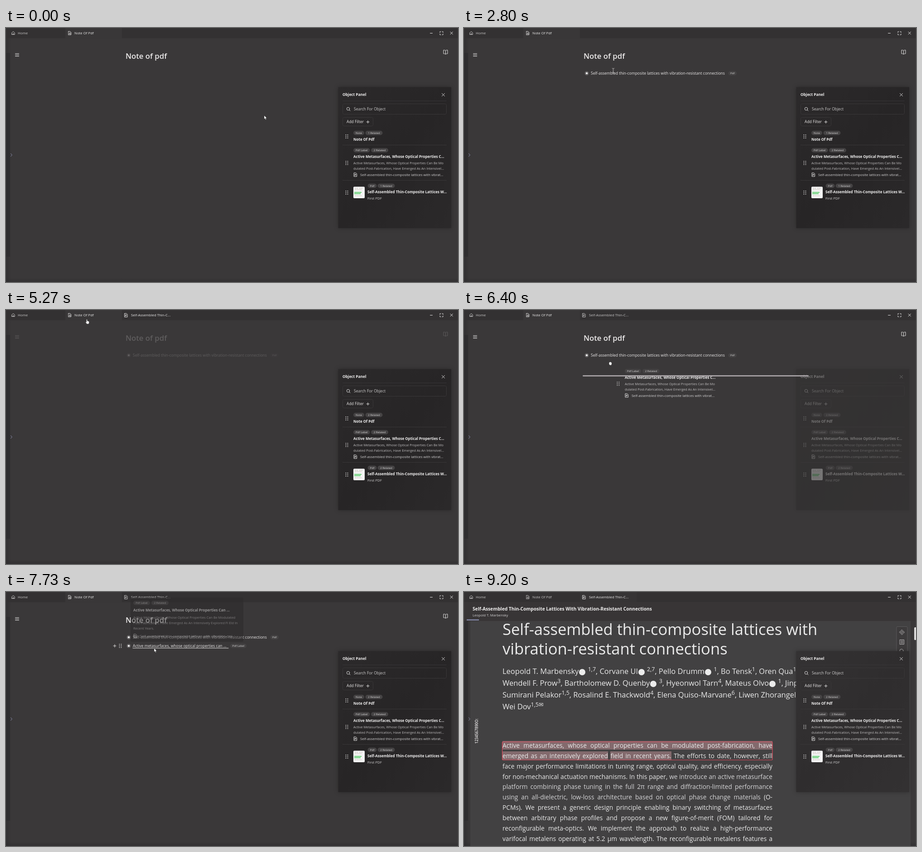
An HTML page for the animation above (9540 ms loop, 998 by 561 pixels).

```html
<!DOCTYPE html>
<html lang="en">
<head>
<meta charset="utf-8">
<title>Note of pdf</title>
<style>
  html, body { margin: 0; width: 100%; height: 100%; overflow: hidden; background: #3a3839; }
  svg { display: block; width: 100vw; height: 100vh; }
  svg, svg div { font-family: "Open Sans", "Noto Sans", sans-serif; }
  text { fill: #eceaea; font-size: 8.5px; font-weight: 500; white-space: pre; }
  .tab { font-size: 7.8px; fill: #efeeee; }
  .bold { font-size: 8px; font-weight: 700; fill: #f0efef; }
  .soft { font-size: 7.4px; fill: #bebcbd; }
  .ref { font-size: 7.7px; fill: #d2d1d2; }
  .chip { font-size: 6.1px; fill: #d8d7d7; text-anchor: middle; }
  .line { fill: none; stroke: #e4e3e3; stroke-width: 1; stroke-linecap: round; stroke-linejoin: round; }
  .rule { fill: none; stroke: #393738; stroke-width: 1; }
  .two { visibility: hidden; }
  .paper .heading { font-size: 34.5px; font-weight: 400; fill: #ebebeb; }
  .paper div { color: #ebebeb; white-space: nowrap; }
  .authors { font-size: 16.5px; line-height: 26px; }
  .authors sup { font-size: 12.5px; line-height: 0; vertical-align: 6px; }
  .authors i { display: inline-block; width: 14px; height: 14px; margin: 0 1px; border-radius: 50%; background: #ebebeb; vertical-align: -3px; }
  .body { font-size: 13.7px; line-height: 22.83px; font-weight: 500; }
  .body div { text-align: justify; text-align-last: justify; }
  .body mark { color: inherit; background: #836a6d; }
  .body span { color: #d6d6d8; }
</style>
</head>
<body>
<script>
const LOOP = 9540;
const TITLE = "Self-assembled thin-composite lattices with vibration-resistant connections";
const AUTHOR = "Leopold T. Marbensky";

const text = (x, y, str, cls = "", extra = "") => `<text x="${x}" y="${y}" class="${cls}" ${extra}>${str}</text>`;
const line = (d, extra = "") => `<path class="line" d="${d}" ${extra}/>`;
const rect = (x, y, w, h, fill, extra = "") => `<rect x="${x}" y="${y}" width="${w}" height="${h}" fill="${fill}" ${extra}/>`;
const chip = (x, y, w, str, cls = "") =>
  `<g class="${cls}">${rect(x, y - 4.7, w, 9.4, "#454344", 'rx="4.7"')}${text(x + w / 2, y + 2.2, str, "chip")}</g>`;
const dots = (x, y) => [0, 1, 2, 3, 4, 5].map(i =>
  `<circle cx="${x - 2 + i % 2 * 4}" cy="${y - 3.5 + (i >> 1) * 3.5}" r="0.9" fill="#dddcdc"/>`).join("");
const doc = (x, y) => line(`M${x - 3} ${y - 4}h4l2 2v6h-6ZM${x - 1.2} ${y + 2}v-3h2v1.5h-2`, 'stroke-width=".9"');
const bullet = y => `<circle cx="271" cy="${y}" r="4.5" fill="#666465"/><circle cx="271" cy="${y}" r="2.1" fill="#fff"/>`;
const related = (x, y) => chip(x, y, 38, "1 Related", "one") + chip(x, y, 38, "2 Related", "two");
const thumb = (x, y) => rect(x, y, 25, 25.5, "#f4f4f4", 'rx="2"') +
  `<path d="M${x + 3} ${y + 3.5}h8m2 0h8M${x + 3} ${y + 6.5}h15M${x + 3} ${y + 20}h16" stroke="#b9a9a0" stroke-width=".8" stroke-dasharray="3 1"/>
   <path d="M${x + 2} ${y + 12.5}h16M${x + 2} ${y + 15.5}h14" stroke="#36c24a" stroke-width="1.3"/>`;
const hover = y => line(`M237 ${y}h6M240 ${y - 3}v6`) + dots(252.5, y);

const defs = `<defs>
  <linearGradient id="panelFill" x2="1" y2="1"><stop stop-color="#2c2a2b"/><stop offset=".5" stop-color="#272526"/><stop offset="1" stop-color="#2b292a"/></linearGradient>
  <linearGradient id="edge"><stop stop-color="#2c2b2d"/><stop offset="1" stop-color="#2c2b2d" stop-opacity="0"/></linearGradient>
  <linearGradient id="floor" x2="0" y2="1"><stop stop-color="#2c2b2d" stop-opacity="0"/><stop offset="1" stop-color="#2c2b2d"/></linearGradient>
  <clipPath id="pageArea"><rect x="14" y="64" width="984" height="497"/></clipPath>
</defs>`;

const backdrop = rect(0, 0, 998, 561, "#3a3839") + rect(0, 55, 9, 450, "#302f31") +
  rect(0, 22, 12, 539, "url(#edge)", 'opacity=".6"') + rect(0, 552, 998, 9, "url(#floor)", 'opacity=".6"');

const tabs = rect(0, 0, 998, 22.5, "#333132") +
  rect(131, 0, 125, 22.5, "#393738", 'id="noteTab"') + rect(256, 0, 125, 22.5, "#363435", 'id="pdfTab"') +
  `<g opacity=".8">${line("M12.8 10.5L16 7.8l3.2 2.7v4h-6.4ZM15 14.5v-2h2v2", 'stroke-width=".9"')}${text(26, 14, "Home", "tab")}</g>
  <g id="noteLabel">${line("M137.5 7.5h4l2 2v5.5h-6ZM139 11h3M139 13h3", 'stroke-width=".9"')}${text(151, 14, "Note Of Pdf", "tab")}</g>
  <g id="openTab"><g id="pdfLabel">${doc(265, 11.5)}${text(276, 14, "Self-Assembled Thin-C...", "tab")}</g></g>` +
  line("M936.5 11.5h5M958 10v-2h2M963 8h2v2M965 13v2h-2M960 15h-2v-2M981 8.5l5.5 5.5M986.5 8.5l-5.5 5.5");

const note = `<g id="note">
  ${line("M20.5 56.5h8M20.5 59.5h8M20.5 62.5h8")}
  ${line("M970.5 50v8c-1-1.2-2.5-1.2-4.5-1.2V48.8c2 0 3.5 0 4.5 1.2c1-1.2 2.5-1.2 4.5-1.2v8c-2 0-3.500 0-4.5 1.2")}
  ${text(264, 67.7, "Note of pdf", "", 'style="font-size:16.7px;font-weight:600"')}
  <g id="first">${bullet(100)}${text(280, 103.2, TITLE)}${chip(583.5, 100, 18.5, "Pdf")}</g>
  <g id="firstHover">${hover(100)}${line("M280 105h299", 'stroke-width=".7"')}</g>
  <g id="second">${bullet(119)}${text(280, 122.2, "Active metasurfaces, whose optical properties can ...")}${chip(495, 119, 36, "Pdf Label")}</g>
  <g id="secondHover">${hover(119)}${line("M280 124h211", 'stroke-width=".7"')}</g>
</g>`;

const header = `<g id="header">
  ${rect(0, 22, 998, 42, "#383536")}
  ${text(19, 40.8, TITLE.replace(/(^|[ -])[a-z]/g, s => s.toUpperCase()), "bold", 'style="font-size:10.2px"')}
  ${text(19, 54, AUTHOR, "ref")}
  ${rect(6, 60.5, 27, 2.2, "#8b90b2")}
</g>`;

const authors = [
  `${AUTHOR}<i></i> <sup>1,7</sup>, Corvane Ul<i></i> <sup>2,7</sup>, Pello Drumm<i></i> <sup>1</sup>, Bo Tensk<sup>1</sup>, Oren Qua<sup>1</sup>, Dr`,
  `Wendell F. Prow<sup>3</sup>, Bartholomew D. Quenby<i></i> <sup>3</sup>, Hyeonwol Tarn<sup>4</sup>, Mateus Olvo<i></i> <sup>1</sup>, Jinpel`,
  `Sumirani Pelakor<sup>1,5</sup>, Rosalind E. Thackwold<sup>4</sup>, Elena Quiso-Marvane<sup>6</sup>, Liwen Zhorangel`,
  `Wei Dov<sup>1,5✉</sup>`];
const abstract = [
  "<mark>Active metasurfaces, whose optical properties can be modulated post-fabrication, have</mark>",
  "<mark>emerged as an intensively explored</mark> <mark>field in recent years.</mark> The efforts to date, however, still",
  "face major performance limitations in tuning range, optical quality, and efficiency, especially",
  "for non-mechanical actuation mechanisms. In this paper, <span>we introduce an active metasurface</span>",
  "<span>platform combining phase tuning in the full 2π range and diffraction-limited performance</span>",
  "<span>using an all-dielectric, low-loss architecture based on optical phase change materials</span> (O-",
  "PCMs). We present a generic design principle enabling binary switching of metasurfaces",
  "between arbitrary phase profiles and propose a new figure-of-merit (FOM) tailored for",
  "reconfigurable meta-optics. We implement the approach to realize a high-performance",
  "varifocal metalens operating at 5.2 μm wavelength. The reconfigurable metalens features a"];
const rows = list => list.map(s => `<div>${s}</div>`).join("");

const page = `<g id="page" clip-path="url(#pageArea)">
  ${rect(14, 64, 972, 497, "#424142")}
  <g id="scroll" class="paper">
    ${text(85, 95, TITLE.slice(0, 43), "heading")}${text(85, 138, TITLE.slice(44), "heading")}
    <foreignObject x="85" y="162" width="800" height="110"><div class="authors">${rows(authors)}</div></foreignObject>
    <foreignObject x="85" y="328.1" width="596" height="233"><div class="body">${rows(abstract)}</div></foreignObject>
    ${rect(84.5, 331, 596.5, 40, "none", 'rx="1.5" stroke="#e04a5c" stroke-width="1.2"')}
    ${text(0, 0, "1234567890O:", "", 'transform="translate(31 335) rotate(-90)" style="font-size:8.2px;font-weight:600"')}
  </g>
  ${rect(955, 76.5, 24, 62, "#3d3b3c", 'rx="2" stroke="#5b595a"')}
  <g class="line" style="stroke:#b5b3b4">
    <path d="M967 83.5l2 2l-2 2l-2-2ZM967 90.5l2 2l-2 2l-2-2ZM963.5 87l2 2l-2 2l-2-2ZM970.5 87l2 2l-2 2l-2-2Z"/>
    <path d="M962.5 105.5h9v10h-9ZM964.5 108h5M964.5 110.5h5M964.5 113h5"/>
    <circle cx="966" cy="130" r="4"/>
  </g>
  ${rect(994, 78, 6, 28, "#dad9d9", 'rx="1.5"')}
</g>`;

const pdfRow = `<g id="pdfRow">${dots(752.5, 363.5)}${thumb(767, 350.5)}
  ${chip(798.5, 348.5, 20, "Pdf")}${related(820.5, 348.5)}
  ${text(798, 365.3, "Self-Assembled Thin-Composite Lattices W...", "bold")}
  ${text(798, 379.2, "First PDF", "ref")}</g>`;
const labelRow = `<g id="labelRow">${dots(752.5, 298)}
  ${chip(767, 270, 36.5, "Pdf Label")}${chip(806, 270, 38, "2 Related")}
  ${text(767, 287, "Active Metasurfaces, Whose Optical Properties C...", "bold")}
  ${text(767, 301.3, "Active Metasurfaces, Whose Optical Properties Can Be Mo", "soft")}
  ${text(767, 313, "dulated Post-Fabrication, Have Emerged As An Intensivel...", "soft")}
  ${doc(771.5, 324)}${text(782, 326.8, TITLE.slice(0, 50) + "...", "ref")}</g>`;

const panel = `<g id="panel">
  ${rect(733.5, 130.5, 249.5, 311.5, "url(#panelFill)", 'style="filter:drop-shadow(0 0 5px #0004)"')}
  ${rect(733.5, 130.5, 249.5, 311.5, "#fff", 'id="glow" fill-opacity=".04"')}
  ${text(743, 150, "Object Panel", "bold", 'style="font-size:8.3px"')}
  ${line("M962.5 144.5l6 6M968.5 144.5l-6 6")}
  <path class="rule" d="M743 161h230M743 258.5h230M743 336.5h230"/>
  <rect class="rule" x="743.5" y="167.5" width="229" height="23" rx="3"/>
  <rect class="rule" x="743.5" y="197.5" width="67" height="19" rx="3"/>
  <circle class="line" cx="755.5" cy="178.5" r="3.2"/>${line("M758 181l2 2")}
  ${text(768, 182.2, "Search For Object", "", 'style="fill:#cfcece"')}
  ${text(752, 210.2, "Add Filter")}${line("M796 207.5h6M799 204.5v6")}
  ${dots(752.5, 239.5)}${chip(767, 231.8, 24, "Note")}${related(793.5, 231.8)}${text(767, 248.5, "Note Of Pdf", "bold")}
  ${labelRow}${pdfRow}
</g>`;

const popups = `<g id="pdfPopup">
  ${rect(275, 26, 249, 64, "#2b292a", 'rx="3"')}${thumb(282, 45)}
  ${chip(314, 42, 20, "Pdf")}${chip(336, 42, 38, "1 Related")}
  ${text(314, 59, "Self-Assembled Thin-Composite Lattices W...", "bold")}${text(314, 73, "First PDF", "ref")}
</g>
<g id="labelPopup">
  ${rect(275, 12, 249, 98, "#2b292a", 'rx="3"')}
  ${chip(281, 24, 37, "Pdf Label")}${chip(321, 24, 38, "2 Related")}
  ${text(281, 43.2, "Active Metasurfaces, Whose Optical Properties Can ...", "bold")}
  ${text(281, 59, "Active Metasurfaces, Whose Optical Properties Can Be Modulated", "soft")}
  ${text(281, 70.8, "Post-Fabrication, Have Emerged As An Intensively Explored Fi Eld In", "soft")}
  ${text(281, 82.5, "Recent Years.", "soft")}
  ${doc(285.5, 97)}${text(296, 99.6, TITLE.slice(0, 58), "ref")}
</g>`;

const drag = `<use id="pdfGhost" href="#pdfRow"/><use id="labelGhost" href="#labelRow"/>
  ${rect(262, 127.2, 499, 2.8, "#9f9d9e", 'id="pdfBar" rx="1.4"')}
  ${rect(262, 144, 499, 2.8, "#a8a3a6", 'id="labelBar" rx="1.4"')}`;

const cursor = `<g id="cursor" fill="#fff" stroke="#222" stroke-width=".6">
  <path id="arrow" d="M0 0V8.4L1.9 6.7L3.2 9.8L4.7 9.1L3.4 6.2H6Z"/>
  <path id="fist" d="M-3 -1Q-2.8 -3 -1.5 -2.8Q0 -4 1 -3Q3.2 -3 3.2 -1V1.5Q2.5 4 1.5 4H-1Q-3.5 2 -3 -1Z"/>
  <path id="beam" d="M-2.5 -5Q0 -5 0 -4Q0 -5 2.5 -5M0 -4V4M-2.5 5Q0 5 0 4Q0 5 2.5 5" fill="none" stroke="#d0cfcf" stroke-width=".9"/>
  <path id="pointer" d="M-1 1Q0 -.6 1 1V4Q5 4.3 5 6V8.5L4 11H0L-2.8 7Q-2.5 5.6 -1 6.5Z"/>
</g>`;

document.body.innerHTML = `<svg viewBox="0 0 998 561">${defs}${backdrop}${tabs}${note}${header}${page}
  ${line("M10.5 277.5l3 3l-3 3", 'style="stroke:#8f92b4"')}${panel}${drag}${popups}${cursor}</svg>`;

// Keys are [time in ms, value]; the first and last values are held to the ends of the loop.
function animate(selector, property, keys, easing = "linear") {
  const held = [...keys];
  if (keys[0][0] > 0) held.unshift([0, keys[0][1]]);
  if (keys.at(-1)[0] < LOOP) held.push([LOOP, keys.at(-1)[1]]);
  const frames = held.map(([time, value]) => ({ offset: time / LOOP, [property]: value, easing }));
  for (const el of document.querySelectorAll(selector)) el.animate(frames, { duration: LOOP, iterations: Infinity });
}
const move = (selector, keys) =>
  animate(selector, "transform", keys.map(([t, x, y]) => [t, `translate(${x}px, ${y}px)`]));
const fade = (selector, ...keys) => animate(selector, "opacity", keys);
// Visible only inside the given [from, to] spans, with hard edges.
function show(selector, ...spans) {
  const keys = spans.flatMap(([from, to]) => [[from, "visible"], [to, "hidden"]]);
  if (spans[0][0] > 0) keys.unshift([0, "hidden"]);
  animate(selector, "visibility", keys, "steps(1, end)");
}

move("#cursor", [
  [70, 570, 193], [250, 690, 205], [430, 806, 255], [670, 750, 307], [870, 750, 307], [1330, 752, 363],
  [1470, 752, 363], [1670, 477, 182], [1900, 360, 116], [2270, 329.5, 94], [2800, 329.5, 94],
  [3050, 327, 99], [4400, 327, 99], [5000, 178.5, 20], [5330, 178.5, 20], [5750, 700, 260], [6050, 752, 298],
  [6130, 752, 298], [6400, 323, 118], [6530, 323, 116], [6870, 323, 114], [7150, 327, 124], [7900, 327, 124],
  [8700, 262, 364], [8870, 262, 364], [9180, 70, 556], [9200, 70, 575]]);
show("#arrow", [0, 1330], [3700, 4900], [5330, 6060], [7680, LOOP]);
show("#fist", [1330, 2470], [6060, 6870]);
show("#beam", [2470, 2950], [6870, 7070]);
show("#pointer", [2950, 3700], [4900, 5330], [7070, 7680]);

fade("#panel", [1470, 1], [1770, .25], [2470, .25], [2670, 1], [6130, 1], [6430, .25], [6870, .25], [7070, 1]);
move("#pdfGhost", [[1470, 0, 0], [1670, -223.5, -140], [1900, -355, -234], [2270, -423, -275]]);
move("#labelGhost", [[6130, 0, 0], [6400, -412, -135], [6530, -426, -157], [6730, -426, -160]]);
show("#pdfGhost", [1470, 2470]);
show("#labelGhost", [6130, 6870]);
show("#pdfBar", [1540, 2470]);
show("#labelBar", [6270, 6870]);

fade("#note", [3470, 1], [3640, 0], [5230, 0], [5270, .2], [5470, 1], [7740, 1], [7840, 0]);
fade("#first", [2470, 0], [2600, 1]);
fade("#second", [6870, 0], [7000, 1]);
show("#firstHover", [2950, 3600]);
show("#secondHover", [7070, LOOP]);
fade("#pdfPopup", [3050, 0], [3200, 1], [3470, 1], [3600, 0]);
fade("#labelPopup", [7150, 0], [7330, 1], [7660, 1], [7800, 0]);

show("#noteTab", [0, 3500], [5230, 7790]);
show("#pdfTab", [3500, 5230], [7790, LOOP]);
show("#openTab", [3500, LOOP]);
fade("#noteLabel", [3500, 1], [3570, .8], [5230, .8], [5270, 1], [7790, 1], [7860, .8]);
fade("#pdfLabel", [5270, 1], [5470, .8], [7790, .8], [7860, 1]);
show(".one", [0, 3600]);
show(".two", [3600, LOOP]);
fade("#header", [3500, 0], [3700, 1], [5230, 1], [5230, 0], [7770, 0], [7900, 1]);
fade("#page, #glow", [4400, 0], [4600, 1], [5230, 1], [5230, 0], [7770, 0], [7900, 1]);
move("#scroll", [[8200, 0, 130], [8600, 0, 0]]);
</script>
</body>
</html>
```
